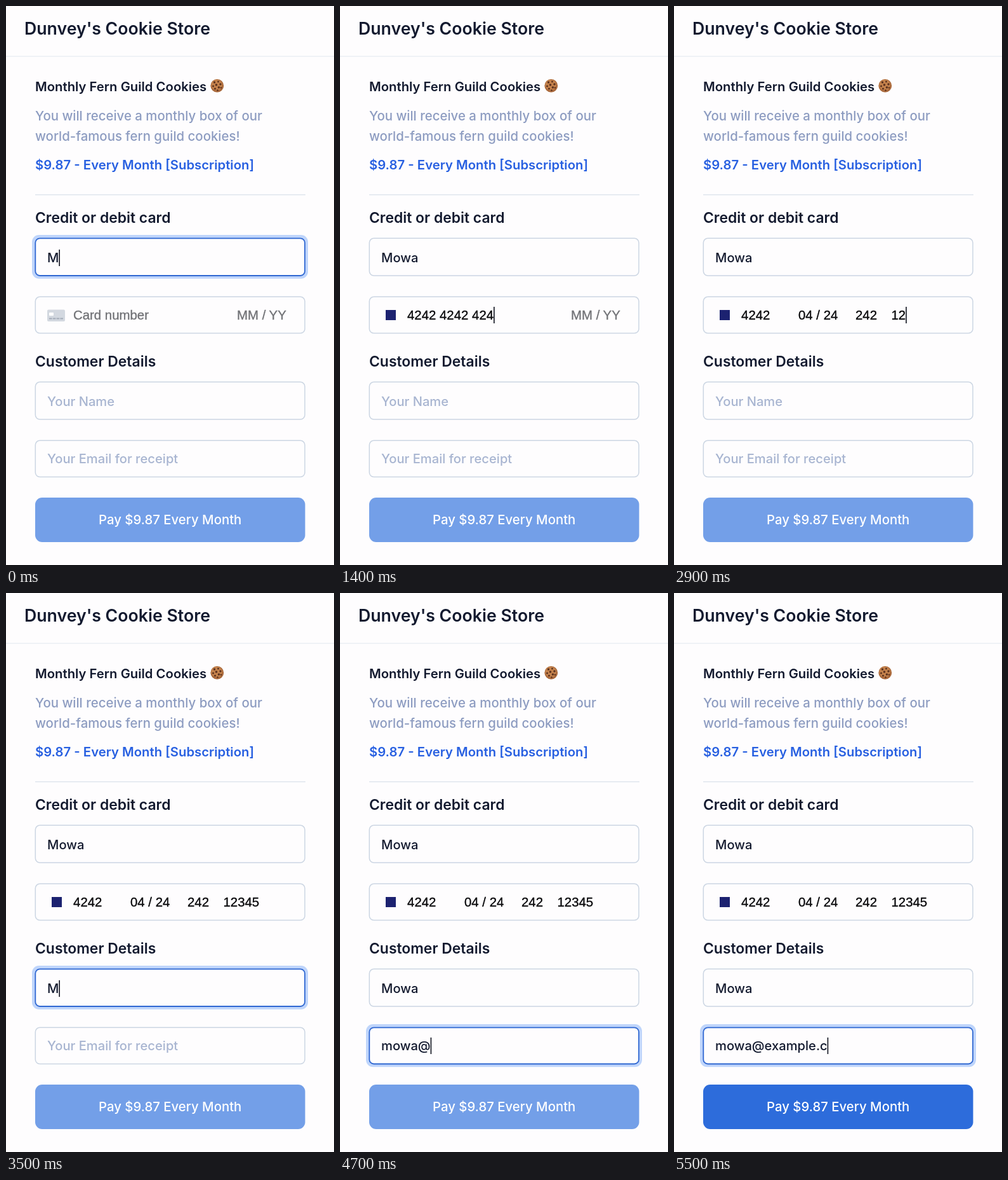
Write an HTML page that moves like this. It is 517 by 879 pixels and loops after 5600 ms.

```html
<!DOCTYPE html>
<html lang="en">
<head>
<meta charset="utf-8">
<title>Checkout form</title>
<style>
  html, body { margin: 0; width: 100%; height: 100%; overflow: hidden; background: #fefdfe; }
  svg { display: block; width: 517px; height: 879px; }
  text { font: 450 20.15px Inter, "Open Sans", sans-serif; fill: #131a2f; white-space: pre; }
  .title { font-size: 26.7px; font-weight: 600; }
  .head { font-size: 22.9px; font-weight: 600; }
  .item { font-size: 20.3px; font-weight: 600; }
  .about { font-size: 20.4px; fill: #8d9cc1; }
  .price { fill: #2860e1; }
  .pay { font-size: 20.35px; font-weight: 500; fill: #fff; }
  .card { font: 400 20.4px "Liberation Sans", Arial, sans-serif; fill: #0a0a0c; stroke: #0a0a0c; stroke-width: .35; }
  .hint { fill: #a8b5d1; }
  .card.hint { fill: #717276; stroke: #717276; }
  .box { fill: #fefdfe; stroke: #ccd6e3; stroke-width: 1.5; }
  .box.on { stroke: #3068d2; stroke-width: 1.8; }
  .ring { fill: #bfd5fb; }
</style>
</head>
<body>
<svg id="stage" viewBox="0 0 517 879">
  <defs><clipPath id="cardClip"><rect x="105" y="460" width="340" height="52"/></clipPath></defs>
  <rect width="517" height="879" fill="#fefdfe"/>
  <text class="title" x="29" y="45">Dunvey's Cookie Store</text>
  <rect y="78.5" width="517" height="1.5" fill="#ebeff4"/>
  <text class="item" x="46" y="134">Monthly Fern Guild Cookies</text>
  <g id="cookie"><circle cx="332.8" cy="125.4" r="10.4" fill="#a9683b"/><circle cx="332.3" cy="124.2" r="8.6" fill="#c4824c"/></g>
  <text class="about" x="46" y="180">You will receive a monthly box of our</text>
  <text class="about" x="46" y="212">world-famous fern guild cookies!</text>
  <text class="item price" x="46" y="257">$9.87 - Every Month [Subscription]</text>
  <rect x="46" y="296" width="426" height="1.5" fill="#e0e6ee"/>
  <text class="head" x="46" y="341">Credit or debit card</text>
  <text class="head" x="46" y="567">Customer Details</text>
  <g id="boxes"></g>
  <g id="blankIcon">
    <rect x="65" y="477.5" width="28" height="18.5" rx="2" fill="#d3d8e0"/>
    <rect x="68" y="482" width="7" height="5" rx="1" fill="#fff"/>
    <path d="M68 491.5H90" stroke="#a4abb8" stroke-width="2" stroke-dasharray="4.6 1.2"/>
  </g>
  <rect id="brandIcon" x="72" y="478" width="16" height="16" fill="#1c2270"/>
  <g id="codeIcon">
    <rect x="65" y="477.5" width="28" height="18.5" rx="2" fill="#d3d8e0"/>
    <rect x="65" y="481" width="28" height="4" fill="#8b93a3"/>
    <rect x="77" y="488" width="13" height="5" rx="1" fill="#fff"/>
  </g>
  <g id="plainText"></g>
  <g id="cardText" clip-path="url(#cardClip)"></g>
  <rect id="caret" width="1.6" height="26" fill="#10131f"/>
  <rect id="button" x="46" y="773" width="425.5" height="70" rx="11"/>
  <text class="pay" x="258.7" y="815" text-anchor="middle">Pay $9.87 Every Month</text>
</svg>
<script>
const LOOP = 5600, TICK = 100;
const $ = id => document.getElementById(id);

function add(parent, tag, attrs) {
  const node = document.createElementNS("http://www.w3.org/2000/svg", tag);
  for (const key in attrs) node.setAttribute(key, attrs[key]);
  return parent.appendChild(node);
}

const chips = [[-4, -5, 1.7], [2, -6, 1.4], [5.5, -2, 1.7], [-1, -1, 1.8], [-6, 1, 1.5], [3, 3, 1.8], [-3, 5, 1.6], [6.5, 3.5, 1.2], [1, 7.5, 1.3]];
for (const [x, y, r] of chips) add($("cookie"), "circle", { cx: 332.5 + x, cy: 125 + y, r, fill: "#5c321f" });

function makeBox(y, height) {
  const ring = add($("boxes"), "rect", { class: "ring", x: 41, y: y - 5, width: 435, height: height + 10, rx: 11 });
  const box = add($("boxes"), "rect", { class: "box", x: 46.3, y: y + .3, width: 424.7, height, rx: 7 });
  return on => {
    ring.style.display = on ? "" : "none";
    box.classList.toggle("on", on);
  };
}
const boxes = { holder: makeBox(365, 58.7), number: makeBox(457, 57.2), name: makeBox(591, 58.7), email: makeBox(683, 57.2) };

function makeField(parent, x, y, hint, kind = "") {
  return { node: add(parent, "text", { y }), x, y, hint, kind };
}
const plain = $("plainText"), card = $("cardText");
const fields = {
  holder: makeField(plain, 65, 403, ""),
  number: makeField(card, 106, 493, "Card number", "card"),
  expiry: makeField(card, 364, 493, "MM / YY", "card"),
  cvc: makeField(card, 286, 493, "CVC", "card"),
  postcode: makeField(card, 342.5, 493, "Postcode", "card"),
  name: makeField(plain, 65, 629, "Your Name"),
  email: makeField(plain, 65, 719, "Your Email for receipt")
};

const focusTimes = [[0, "holder"], [400, "number"], [1700, "expiry"], [2200, "cvc"], [2600, "postcode"], [3300, "name"], [3900, "email"]];

const clamp = v => Math.max(0, Math.min(1, v));
const ease = v => v * v * (3 - 2 * v);
const count = (t, start, step) => Math.max(0, Math.floor((t - start) / step) + 1);
const typed = (text, t, start, step = TICK) => text.slice(0, count(t, start, step));

function cardNumber(t) {
  const digits = Math.min(16, count(t, 700, 65));
  return "4242 4242 4242 4242".slice(0, digits && digits + Math.floor((digits - 1) / 4));
}

function expiry(t) {
  const stages = ["", "0", "04 / ", "04 / 2", "04 / 24"];
  return stages[Math.min(4, count(t, 1900, TICK))];
}

function email(t) {
  const length = t < 4700 ? Math.min(4, count(t, 4200, TICK)) : t < 4900 ? 5 : 5 + count(t, 4900, 75);
  return "mowa@example.c".slice(0, length);
}

function setField(key, value, shift = 0) {
  const { node, x, hint, kind } = fields[key];
  node.textContent = value || hint;
  node.setAttribute("class", value ? kind : kind + " hint");
  node.setAttribute("x", x + shift);
  return x + shift + (value ? node.getComputedTextLength() : 0);
}

function mix(a, b, k) {
  return `rgb(${a.map((v, i) => Math.round(v + (b[i] - v) * k))})`;
}

function draw(time) {
  const t = Math.floor(time % LOOP / TICK) * TICK;
  const focus = focusTimes.filter(([start]) => t >= start).pop()[1];
  const slide = ease(clamp((t - 1700) / 250));
  const digits = cardNumber(t);

  const ends = {
    holder: setField("holder", typed("Mowa", t, 0)),
    number: setField("number", digits, -153 * slide),
    expiry: setField("expiry", expiry(t), -168 * slide),
    cvc: setField("cvc", typed("242", t, 2400), 168 * (1 - slide)),
    postcode: setField("postcode", typed("12345", t, 2800), 168 * (1 - slide)),
    name: setField("name", typed("Mowa", t, 3500)),
    email: setField("email", email(t))
  };
  for (const key in boxes) boxes[key](focus === key && key !== "number");

  const show = (id, on) => $(id).style.display = on ? "" : "none";
  show("blankIcon", !digits);
  show("brandIcon", digits && focus !== "cvc");
  show("codeIcon", focus === "cvc");

  $("caret").setAttribute("x", ends[focus]);
  $("caret").setAttribute("y", fields[focus].y - 20);
  $("button").setAttribute("fill", mix([115, 159, 232], [45, 108, 219], ease(clamp((t - 4900) / 400))));
}

function frame() {
  draw(performance.now());
  requestAnimationFrame(frame);
}
frame();
</script>
</body>
</html>
```
